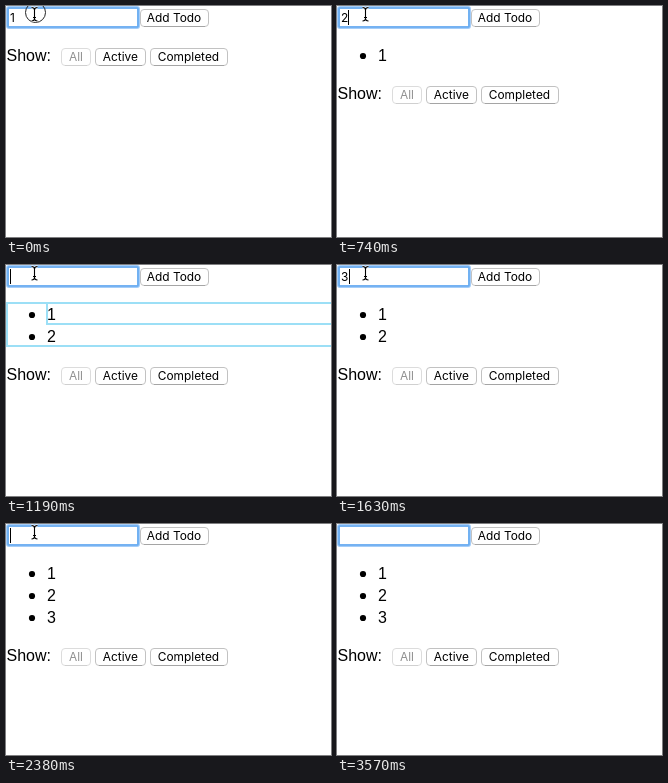
These frames come from a looping animation (325 by 231 pixels, 3720 ms). An HTML page:

```html
<!DOCTYPE html>
<html lang="en">
<head>
<meta charset="utf-8">
<title>Todo list</title>
<style>
  html, body { margin: 0; width: 100%; height: 100%; overflow: hidden; background: #fff; }
  svg { display: block; width: 325px; height: 231px; }
  text { font: 16px "Liberation Sans", Arial, sans-serif; }
  .ui { font: 11.9px Inter, Roboto, sans-serif; }
  .button rect { fill: #fff; stroke: #c2c2c2; }
  .button path { stroke: #a5a5a5; }
  .off rect { stroke: #dcdcdc; }
  .off path { stroke: #d0d0d0; }
  .off text { fill: #909090; }
  .flash rect { fill: none; stroke: #9cdff6; stroke-width: 2; }
  .halo { fill: none; stroke: #fff; stroke-width: 2.6; opacity: .85; }
  .beam { fill: none; stroke: #000; stroke-width: 1.1; }

  .t { animation: 3720ms step-end infinite; }
  .one { animation-name: one; }
  .two { animation-name: two; }
  .three { animation-name: three; }
  .item1 { animation-name: item1; }
  .item2 { animation-name: item2; }
  .item3 { animation-name: item3; }
  .flash1 { animation-name: flash1; }
  .flash2 { animation-name: flash2; }
  .flash3 { animation-name: flash3; }
  .filters { animation-name: filters; }
  .caret { animation-name: caret; }
  .ibeam { animation-name: ibeam; }
  .arrow { animation-name: arrow; }

  /* typed digits */
  @keyframes one { 0% { opacity: 1 } 4.03%, 100% { opacity: 0 } }
  @keyframes two { 0% { opacity: 0 } 19.89% { opacity: 1 } 27.95%, 100% { opacity: 0 } }
  @keyframes three { 0% { opacity: 0 } 43.81% { opacity: 1 } 55.91%, 100% { opacity: 0 } }

  /* list items */
  @keyframes item1 { 0% { opacity: 0 } 4.03%, 100% { opacity: 1 } }
  @keyframes item2 { 0% { opacity: 0 } 27.95%, 100% { opacity: 1 } }
  @keyframes item3 { 0% { opacity: 0 } 55.91%, 100% { opacity: 1 } }

  /* update outlines */
  @keyframes flash1 { 0% { opacity: 0 } 8.06% { opacity: 1 } 12.09%, 100% { opacity: 0 } }
  @keyframes flash2 { 0% { opacity: 0 } 31.98% { opacity: 1 } 36.02%, 100% { opacity: 0 } }
  @keyframes flash3 { 0% { opacity: 0 } 55.91% { opacity: 1 } 63.97%, 100% { opacity: 0 } }

  @keyframes filters {
    0% { transform: translateY(0) }
    4.03% { transform: translateY(38px) }
    27.95% { transform: translateY(60px) }
    55.91%, 100% { transform: translateY(82px) }
  }
  @keyframes caret {
    0% { opacity: 0; transform: translateX(0) }
    4.03% { opacity: 1; transform: translateX(0) }
    19.89% { opacity: 1; transform: translateX(7px) }
    27.95% { opacity: 1; transform: translateX(0) }
    43.81% { opacity: 1; transform: translateX(8px) }
    55.91% { opacity: 1; transform: translateX(0) }
    68.01% { opacity: 0; transform: translateX(0) }
    83.87% { opacity: 1; transform: translateX(0) }
    95.96%, 100% { opacity: 0; transform: translateX(0) }
  }
  @keyframes ibeam {
    0% { opacity: 1; transform: translateX(0) }
    72.04% { opacity: 1; transform: translateX(12px) }
    76.07%, 100% { opacity: 0; transform: translateX(12px) }
  }
  @keyframes arrow { 0% { opacity: 0 } 76.07% { opacity: 1 } 79.83%, 100% { opacity: 0 } }
</style>
</head>
<body>
<svg viewBox="0 0 325 231">
  <defs>
    <path id="beam" d="M25.5 1.5Q28.5 1.5 28.5 4V12.5Q28.5 15 25.5 15M31.5 1.5Q28.5 1.5 28.5 4M28.5 12.5Q28.5 15 31.5 15M27 11.5H30"/>
  </defs>

  <rect x="1.5" y="1.5" width="131" height="20" rx="1.5" fill="#fff" stroke="#a5cdf8" stroke-width="3"/>
  <rect x="2" y="2" width="130" height="19" rx=".5" fill="none" stroke="#65abf1" stroke-width="1.6"/>
  <text class="ui t one" x="4" y="16">1</text>
  <text class="ui t two" x="4" y="16">2</text>
  <text class="ui t three" x="4" y="16">3</text>
  <rect class="t caret" x="4" y="4" width="1" height="15"/>

  <g class="button">
    <rect x="134.5" y="3.5" width="68" height="17" rx="3.5"/>
    <path d="M138 20.5H199"/>
    <text class="ui" x="140.8" y="16">Add Todo</text>
  </g>

  <g class="t item1"><circle cx="26" cy="50" r="3.1"/><text x="41" y="55">1</text></g>
  <g class="t item2"><circle cx="26" cy="72" r="3.1"/><text x="41" y="77">2</text></g>
  <g class="t item3"><circle cx="26" cy="94" r="3.1"/><text x="41" y="99">3</text></g>

  <g class="flash t flash1">
    <rect x="1" y="38" width="340" height="21"/>
  </g>
  <g class="flash t flash2">
    <rect x="1" y="38" width="340" height="43"/>
    <rect x="41" y="38" width="300" height="21"/>
  </g>
  <g class="flash t flash3">
    <rect x="1" y="38" width="340" height="65"/>
    <rect x="41" y="38" width="300" height="21"/>
    <rect x="41" y="60" width="300" height="21"/>
  </g>

  <g class="t filters">
    <text x="0.5" y="55">Show:</text>
    <g class="button off">
      <rect x="55.5" y="42.5" width="29" height="17" rx="3.5"/>
      <path d="M59 59.5H81"/>
      <text class="ui" x="63" y="55">All</text>
    </g>
    <g class="button">
      <rect x="89.5" y="42.5" width="50" height="17" rx="3.5"/>
      <path d="M93 59.5H136"/>
      <text class="ui" x="96.8" y="55">Active</text>
    </g>
    <g class="button">
      <rect x="144.5" y="42.5" width="77" height="17" rx="3.5"/>
      <path d="M148 59.5H218"/>
      <text class="ui" x="151.8" y="55">Completed</text>
    </g>
  </g>

  <circle class="t one" cx="29.5" cy="6.5" r="10" fill="none" stroke="#222"/>
  <g class="t ibeam">
    <use href="#beam" class="halo"/>
    <use href="#beam" class="beam"/>
  </g>
  <path class="t arrow" d="M53.5 29V43L56.7 40L59 45.2L61.4 44.2L59.2 39.2H63.6Z" stroke="#fff" stroke-width="1" stroke-linejoin="round"/>
</svg>
</body>
</html>
```
